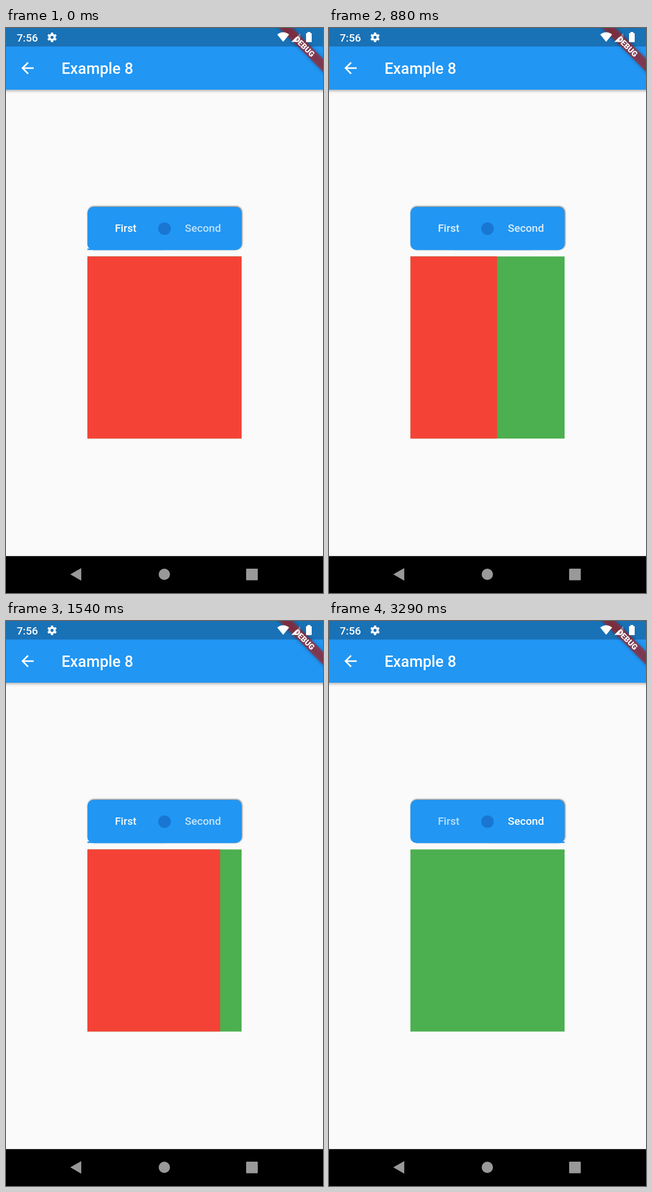
An HTML page for the animation above (3330 ms loop, 561x998 px).

```html
<!DOCTYPE html>
<html lang="en">
<head>
<meta charset="utf-8">
<title>Tab switch</title>
<style>
  html, body { margin: 0; width: 100%; height: 100%; overflow: hidden; background: #fafafa; }
  svg { display: block; width: 100%; height: 100%; }
  text { font-family: Roboto, sans-serif; font-weight: 500; font-size: 19.1px; fill: #fff; }
  .bar { filter: drop-shadow(0 2px 2.5px rgba(0, 0, 0, .32)); }
  .card { filter: drop-shadow(1px -.6px 1.8px rgba(60, 60, 60, .75)); }
  .mid { text-anchor: middle; }
</style>
</head>
<body>
<svg viewBox="0 0 561 998">
  <rect width="561" height="998" fill="#fafafa"/>

  <g class="bar"><rect x="-20" y="-20" width="601" height="129" fill="#2196f3"/></g>
  <rect width="561" height="32.7" fill="#1971b6"/>
  <path transform="translate(21.8 54.5) scale(1.364)" fill="#fff"
    d="M20 11H7.83l5.59-5.59L12 4l-8 8 8 8 1.41-1.41L7.83 13H20z"/>
  <text x="98.2" y="81" style="font-size:27.3px">Example 8</text>

  <!-- tab card -->
  <g class="card"><rect x="144.1" y="316" width="272.8" height="76.2" rx="10.5" fill="#2196f3"/></g>
  <rect id="indicator" y="389.5" width="136.4" height="2.7" fill="#2196f3"/>
  <circle cx="280.5" cy="354.4" r="11" fill="#1976d2"/>
  <text id="first" class="mid" x="211.8" y="359.6">First</text>
  <text id="second" class="mid" x="348.5" y="359.6">Second</text>

  <!-- pages -->
  <rect x="144.1" y="403.5" width="272.8" height="321.7" fill="#4caf50"/>
  <rect id="red" x="144.1" y="403.5" height="321.7" fill="#f44336"/>

  <!-- corner banner -->
  <g transform="translate(561 0) rotate(45)">
    <rect x="-60" y="38.2" width="120" height="16.4" fill="#b71c1c" fill-opacity=".627"
      style="filter:drop-shadow(0 0 3px rgba(0,0,0,.5))"/>
    <text class="mid" y="51.4" style="font-size:13.9px;font-weight:900">DEBUG</text>
  </g>

  <!-- status icons -->
  <text x="19" y="23.6">7:56</text>
  <g transform="translate(81.5 16.5)" fill="none" stroke="#fff">
    <circle r="4.6" stroke-width="3.8"/>
    <circle r="7" stroke-width="3" pathLength="12" stroke-dasharray="1 1" transform="rotate(15)"/>
  </g>
  <g fill="#fff">
    <path d="M490.5 24.5L480 11.4Q490.5 3.4 501 11.4Z"/>
    <path d="M505 24.5L521 8.5V24.5Z" opacity=".3"/>
    <path d="M505 24.5L514 15.5V24.5Z"/>
    <path d="M533.5 7h5v2h1.5q1 0 1 1v14q0 1-1 1h-8q-1 0-1-1v-14q0-1 1-1h1.5z"/>
  </g>

  <!-- navigation bar -->
  <rect y="932.8" width="561" height="65.2"/>
  <g fill="#999">
    <path d="M113.8 965L133.2 954V976.2Z"/>
    <circle cx="280.2" cy="965" r="10"/>
    <rect x="425" y="955" width="20.6" height="20.6" rx="1.4"/>
  </g>
</svg>
<script>
const LOOP = 3330, STEP = 1000 / 24, SPAN = 300, LEFT = 144.1, WIDTH = 272.8;
const moves = [{ at: 801, to: 1 }, { at: 1370, to: 0 }, { at: 2118, to: 1 }];
const $ = id => document.getElementById(id);
const red = $('red'), indicator = $('indicator'), first = $('first'), second = $('second');

// cubic-bezier(.25, .1, .25, 1)
function ease(x) {
  if (x <= 0) return 0;
  if (x >= 1) return 1;
  let lo = 0, hi = 1, s;
  for (let i = 0; i < 24; i++) {
    s = (lo + hi) / 2;
    if (.75 * s * (1 - s) + s ** 3 < x) lo = s; else hi = s;
  }
  return .3 * s * (1 - s) ** 2 + 3 * s * s * (1 - s) + s ** 3;
}

// The indicator closes on its goal a bit more each tick, so it runs ahead of the page.
function chase(ms) {
  let rest = 1;
  for (let t = 1000 / 60; t <= Math.min(ms, SPAN); t += 1000 / 60) rest *= 1 - ease(t / SPAN);
  return ms >= SPAN ? 1 : 1 - rest;
}

function draw(now) {
  const tick = Math.floor((now % LOOP + 2) / STEP);
  const t = Math.round(tick * STEP / 10) * 10;
  let page = 0, mark = 0;
  for (const { at, to } of moves) {
    if (t < at) break;
    const from = 1 - to;
    page = from + (to - from) * ease((t - at) / SPAN);
    mark = from + (to - from) * chase(t - at);
  }
  red.setAttribute('width', WIDTH * (1 - page));
  indicator.setAttribute('x', LEFT + WIDTH / 2 * mark);
  first.setAttribute('fill-opacity', 1 - .3 * page);
  second.setAttribute('fill-opacity', .7 + .3 * page);
}

function loop() {
  draw(performance.now());
  requestAnimationFrame(loop);
}
loop();
</script>
</body>
</html>
```
